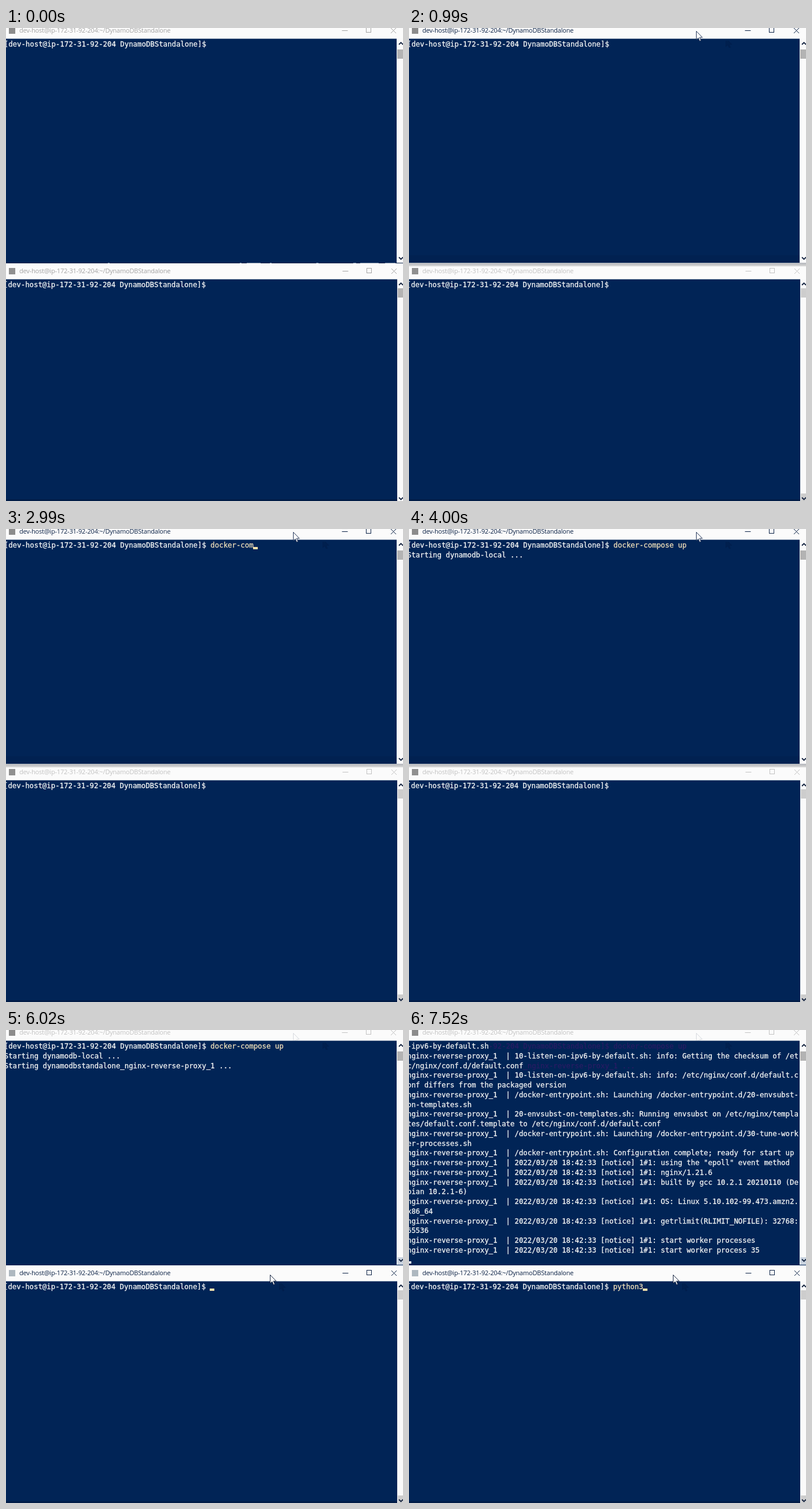
Animation of 686 by 816 pixels, one loop 8000 ms. Source, as an HTML page with a canvas:

```html
<!DOCTYPE html>
<html lang="en">
<head>
<meta charset="utf-8">
<title>Two terminals</title>
<style>
  html, body { margin: 0; width: 686px; height: 816px; overflow: hidden; background: #012456; }
  canvas { display: block; }
</style>
</head>
<body>
<canvas id="stage" width="686" height="816"></canvas>
<script>
const ctx = document.getElementById('stage').getContext('2d');
const LOOP = 8000, CELL = 7.43, ROW = 16.75, COLS = 91, TITLE_BOTTOM = 18.5;
const BLUE = '#012456', WHITE = '#f4f4f4', CREAM = '#f0dfba', GOLD = '#fbe2ac', GHOST = '#291c64';
const HOST = 'dev-host@ip-172-31-92-204';
const PROMPT = `[${HOST} DynamoDBStandalone]$`;
const TITLE = `${HOST}:~/DynamoDBStandalone`;
const STARTING = ['Starting dynamodb-local ...', 'Starting dynamodbstandalone_nginx-reverse-proxy_1 ...'];

const entry = '/docker-entrypoint.sh: ';
const listen = '10-listen-on-ipv6-by-default.sh';
const notice = '2022/03/20 18:42:33 [notice] 1#1: ';
const conf = '/etc/nginx/conf.d/default.conf';
// The first wrapped line has already scrolled off the top.
const LOG = [
  `${entry}Launching /docker-entrypoint.d/${listen}`,
  `${listen}: info: Getting the checksum of ${conf}`,
  `${listen}: info: ${conf} differs from the packaged version`,
  `${entry}Launching /docker-entrypoint.d/20-envsubst-on-templates.sh`,
  `20-envsubst-on-templates.sh: Running envsubst on /etc/nginx/templates/default.conf.template to ${conf}`,
  `${entry}Launching /docker-entrypoint.d/30-tune-worker-processes.sh`,
  `${entry}Configuration complete; ready for start up`,
  `${notice}using the "epoll" event method`,
  `${notice}nginx/1.21.6`,
  `${notice}built by gcc 10.2.1 20210110 (Debian 10.2.1-6)`,
  `${notice}OS: Linux 5.10.102-99.473.amzn2.x86_64`,
  `${notice}getrlimit(RLIMIT_NOFILE): 32768:65536`,
  `${notice}start worker processes`,
  `${notice}start worker process 35`
].flatMap(m => `nginx-reverse-proxy_1  | ${m}`.match(new RegExp(`.{1,${COLS}}`, 'g'))).slice(1);

const upper = { x: -3.3, y: 0, edge: 675, bottom: 405, boxX: 622.5, thumbY: 37, downY: 395.5 };
const lower = { x: -4, y: 415, edge: 676, bottom: 816, boxX: 623.5, thumbY: 449, downY: 810 };

function rect(x, y, w, h, color) {
  ctx.fillStyle = color;
  ctx.fillRect(x, y, w, h);
}

function line(points, color, width = 1) {
  ctx.beginPath();
  points.forEach(p => ctx.lineTo(...p));
  ctx.strokeStyle = color;
  ctx.lineWidth = width;
  ctx.stroke();
}

function clipped(x, y, w, h, paint) {
  ctx.save();
  ctx.beginPath();
  ctx.rect(x, y, w, h);
  ctx.clip();
  paint();
  ctx.restore();
}

function text(win, str, col, row, color = WHITE) {
  ctx.font = '12.4px "DejaVu Sans Mono", monospace';
  ctx.fillStyle = ctx.strokeStyle = color;
  ctx.lineWidth = .3;
  [...str].forEach((ch, i) => {
    const x = win.x + (col + i) * CELL, y = win.y + 32 + row * ROW;
    ctx.fillText(ch, x, y);
    ctx.strokeText(ch, x, y);
  });
}

function cursor(win, col, row, color = GOLD) {
  rect(Math.floor(win.x + col * CELL), Math.floor(win.y + 31 + row * ROW), 8, 4, color);
}

function command(win, str, showCursor) {
  text(win, PROMPT, 0, 0);
  text(win, str, 48, 0, CREAM);
  if (showCursor) cursor(win, 48 + str.length, 0);
}

function pointer(x, y, fill, stroke) {
  const path = new Path2D('M0 0V14.5L3.4 11.5L5.8 17L8 16L5.6 10.7H10.4Z');
  ctx.save();
  ctx.translate(x + .5, y + .5);
  ctx.fillStyle = fill;
  ctx.fill(path);
  ctx.strokeStyle = stroke;
  ctx.lineWidth = 1;
  ctx.stroke(path);
  ctx.restore();
}

function frame(win, color, thumb, iconColor, downColor) {
  const { y, edge, bottom, boxX, thumbY, downY } = win;
  const top = y + TITLE_BOTTOM;
  rect(0, y - 9, 686, 28, '#fbfbfb');
  rect(0, top, 686, bottom - top, BLUE);
  rect(5, y - 1, 11, 11, iconColor);
  ctx.font = '11px "Open Sans", sans-serif';
  ctx.letterSpacing = '-0.2px';
  ctx.fillStyle = color;
  ctx.fillText(TITLE, 23, y + 8.3);
  ctx.letterSpacing = '0px';

  const closeX = boxX + 42.5;
  line([[boxX - 42, y + 4.5], [boxX - 32, y + 4.5]], color);
  ctx.strokeRect(boxX, y - .5, 8, 8);
  line([[closeX, y], [closeX + 9, y + 9]], color);
  line([[closeX + 9, y], [closeX, y + 9]], color);

  rect(edge, y + 18, 686 - edge, bottom - y - 18, '#fafafa');
  rect(edge + 1, thumbY, 10, 16, thumb);
  if (downColor) rect(edge + 1, bottom - 13, 10, 13, downColor);
  line([[679, y + 28.5], [682.5, y + 25], [686, y + 28.5]], '#14233f', 1.8);
  line([[679, downY], [682.5, downY + 3.5], [686, downY]], '#14233f', 1.8);
}

function seam(t) {
  if (t < 990) {
    rect(0, 405, 686, 1, '#10264c');
    [[176, 3], [404, 3], [416, 24], [456, 3], [536, 4], [600, 5], [612, 32], [655, 18]]
      .forEach(([x, w]) => rect(x, 405, w, 1, '#8b98ae'));
  } else if (t < 5500) {
    const shade = ctx.createLinearGradient(0, 405, 0, 412);
    shade.addColorStop(0, '#b4b7bd');
    shade.addColorStop(.7, '#cfcfcf');
    shade.addColorStop(1, '#fbfbfb');
    ctx.fillStyle = shade;
    ctx.fillRect(0, 405, 686, 7);
    rect(0, 392, 675, 13, 'rgba(0,24,64,.25)');
  }
  rect(0, 813, 676, 3, '#011c47');
}

function drawUpper(t) {
  if (t >= 6520) {
    text(upper, PROMPT.slice(19), 19, 0, GHOST);
    text(upper, 'docker-compose up', 48, 0, GHOST);
    text(upper, STARTING[1].slice(27), 27, 2, GHOST);
    LOG.forEach((str, row) => text(upper, str, 0, row));
    cursor(upper, 0, LOG.length, WHITE);
    return;
  }
  const typed = t < 2490 ? 0 : t < 2990 ? 5 : t < 3490 ? 10 : t < 4000 ? 16 : 17;
  command(upper, 'docker-compose up'.slice(0, typed), t >= 2000 && t < 4000);
  if (t >= 4000) text(upper, STARTING[0], 0, 1);
  if (t >= 5500) text(upper, STARTING[1], 0, 2);
  else if (t >= 5000) cursor(upper, 0, 2, WHITE);
}

function drawLower(t) {
  const typed = t < 7020 ? 0 : t < 7520 ? 2 : 7;
  if (t >= 6520 && t < 7020) cursor(lower, 48, 0, GHOST);
  command(lower, 'python3'.slice(0, typed), t >= 6020 && (t < 6520 || t >= 7020));
}

function drawPointers(t) {
  const ink = '#14233f', faint = 'rgba(0,10,40,.13)';
  if (t >= 500 && t < 990) pointer(547, 17, '#fff', ink);
  if (t >= 990) {
    clipped(540, 22, 25, 12, () => pointer(547, 17, faint, faint));
    if (t < 5000) pointer(496, 5, '#fdfdfd', '#26385a');
    else clipped(490, 0, 25, 18, () => pointer(496, 5, '#fbfbfb', '#d6d9de'));
  }
  if (t >= 5000 && t < 5500) pointer(472, 433, '#fff', '#dfe5ee');
  if (t >= 5500) {
    clipped(465, 437, 25, 14, () => pointer(472, 433, faint, faint));
    pointer(456, 422, '#fff', ink);
  }
}

function draw(t) {
  const dark = '#0a2145', pale = '#c2c2c2', grey = '#a3a3a3';
  const upperColor = t < 990 ? grey : t < 5500 ? dark : pale;
  const lowerColor = t < 990 ? grey : t < 5500 ? pale : dark;
  rect(0, 0, 686, 816, BLUE);
  frame(lower, lowerColor, t < 500 ? '#b3b3b3' : '#cdcdcd', t < 5500 ? '#909090' : '#aeb8c0', t < 500 ? null : '#cdcdcd');
  frame(upper, upperColor, '#b3b3b3', '#8c8c8c', t < 5500 ? null : '#c9d3df');
  seam(t);
  drawUpper(t);
  drawLower(t);
  drawPointers(t);
}

const start = performance.now();
function tick() {
  draw((performance.now() - start) % LOOP);
  requestAnimationFrame(tick);
}
tick();
</script>
</body>
</html>
```
